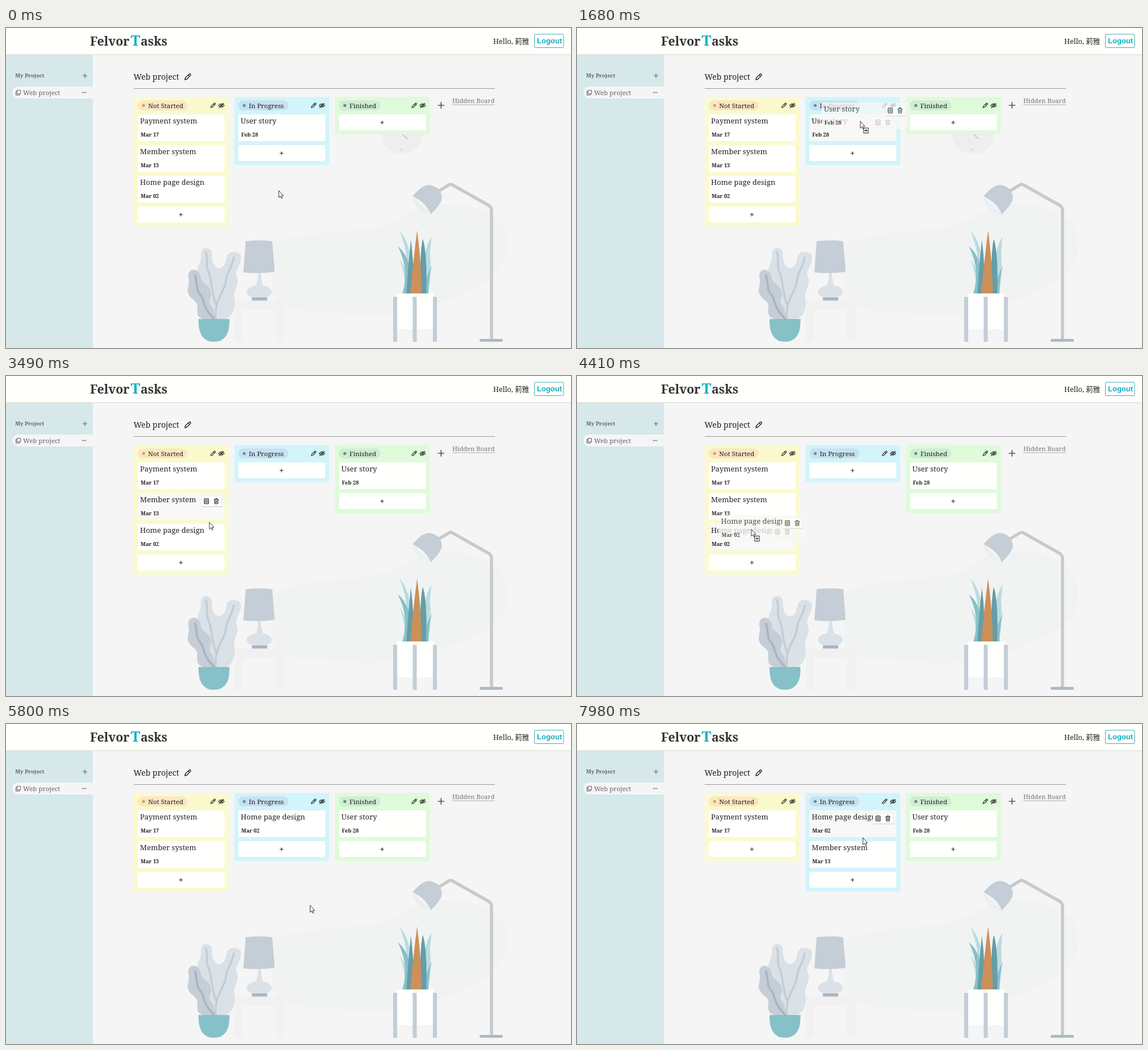
An HTML page for the animation above (8000 ms loop, 995 by 563 pixels).

```html
<!DOCTYPE html>
<html lang="en">
<head>
<meta charset="utf-8">
<title>Task board</title>
<style>
html, body { margin: 0; width: 100%; height: 100%; overflow: hidden; background: #f5f5f5; }
svg { display: block; width: 100vw; height: 100vh; }
text { font-family: "Noto Serif", "Noto Sans CJK TC", "Noto Sans CJK JP", "Noto Sans CJK SC", serif; fill: #222; }
.name { font-size: 13px; }
.date { font-size: 9.4px; font-weight: bold; }
.head { font-size: 11.5px; }
.logo { font-size: 21.4px; font-weight: bold; fill: #333; }
.line { fill: none; stroke: #222; stroke-width: 1.1; stroke-linecap: round; stroke-linejoin: round; }
</style>
</head>
<body>
<svg viewBox="0 0 995 563" preserveAspectRatio="none">
  <defs>
    <g id="pencil" class="line"><path d="M-4 4l.8-3L2-3.8q1-.9 1.9 0t0 1.9L-1.2 3.2zM.8-2.6l1.9 1.9"/></g>
    <g id="eye" class="line"><path d="M-5 0Q0-6 5 0Q0 6-5 0zM-4 4L4-4"/><circle r="1.6"/></g>
    <path id="plus" class="line" d="M-2.7 0H2.7M0-2.7V2.7"/>
    <g id="tools">
      <rect x=".5" y="1" width="36" height="18.5" rx="2" fill="#000" opacity=".13"/>
      <rect width="36" height="18" rx="2" fill="#fffffe" stroke="#e4e4e4" stroke-width=".6"/>
      <g class="line">
        <rect x="5.2" y="4.8" width="7.6" height="9" rx="1" fill="#ddd"/>
        <path d="M7 7.3h4M7 9.3h4M7 11.3h4" stroke-width=".8"/>
        <path d="M22.3 6.3h8M24.9 6V4.7h2.8V6M23.2 6.5l.5 7.3h5.2l.5-7.3M25.4 8.5v3.2M27.2 8.5v3.2"/>
      </g>
    </g>
    <path id="arrow" d="M.5 0V12.3L3.3 9.7 5.1 13.8 6.9 13 5.2 9.1H8.6Z" fill="#fff" stroke="#222" stroke-width=".9"/>
    <g id="copy"><rect x="6.5" y="12" width="8" height="9" fill="#fff" stroke="#222"/>
      <path class="line" d="M8.3 16.5h4.4M10.5 14.3v4.4"/></g>
  </defs>

  <!-- room -->
  <rect width="995" height="563" fill="#f5f5f5"/>
  <path d="M472 380C560 345 650 370 710 325C760 295 840 310 868 340C900 385 880 430 830 455C760 490 690 512 600 503C540 497 490 505 470 470Z" fill="#f1f3f3"/>
  <path d="M403 480H490V552H475V496H417V552H403Z" fill="#f1f1f1"/>
  <circle cx="697" cy="185" r="37" fill="#eee"/>
  <path d="M695 184L707 195" stroke="#bbb" stroke-width="1.3"/>
  <circle cx="696" cy="214" r="2.2" fill="#ddd"/>
  <path d="M762 287L780 276Q783 274 786 276L850 312Q855 315 855 321V549" fill="none" stroke="#c8c9cb" stroke-width="5.5"/>
  <rect x="834" y="547" width="41" height="5" rx="2" fill="#adb9c3"/>
  <path d="M716 296L748 328Q719 323 716 296Z" fill="#eceff1"/>
  <path d="M716 296Q734 274 748 276.500Q768 281 767.500 301Q765 311 748 328Q742 309 716 296Z" fill="#c5ced6"/>

  <path d="M366 513C352 498 338 486 343 470C347 455 336 446 337 428C338 415 345 411 343 399Q343 387 353 387Q363 388 363 399C361 412 369 425 378 422C387 418 387 409 389 401Q393 393 402 394Q414 395 414 405C413 420 401 426 407 440C412 451 400 462 402 474C405 493 400 507 386 513Z" fill="#dae1e7"/>
  <path d="M352 394C357 407 350 417 357 431C364 447 361 465 370 486M401 404C398 422 388 430 387 446C385 466 368 473 369 512" fill="none" stroke="#c3cdd5" stroke-width="3.500" stroke-linecap="round"/>
  <path d="M352 513C333 510 337 499 337 489C337 478 320 476 320 462C320 453 324 449 321 438Q320 427 330 425Q341 426 343 439C344 451 358 450 361 464C363 474 354 480 361 488C368 496 366 505 369 513Z" fill="#c5ced6"/>
  <path d="M333 436C338 451 333 460 343 470C350 480 345 490 366 511" fill="none" stroke="#aab6c0" stroke-width="4" stroke-linecap="round"/>
  <path d="M339 512H393.500Q395 552 366 552Q338 552 339 512Z" fill="#86c1c8"/>

  <path d="M422 375Q446 372 469 375L473 429Q446 433 418 430Z" fill="#c5ced6"/>
  <path d="M444 431H449Q449 445 454 456H439Q444 445 444 431Z" fill="#dae1e7"/>
  <ellipse cx="446" cy="464" rx="22" ry="11.500" fill="#dae1e7"/>
  <rect x="433" y="474" width="27" height="5.500" fill="#aab6c0"/>

  <path d="M704 467Q714 405 693 357Q719 383 716 467ZM733 467Q730 400 749 367Q748 392 743 420L741 467ZM700 467Q706 440 693 407Q710 430 708 467ZM736 467Q743 430 746 390Q751 430 743 467Z" fill="#b9dcdf"/>
  <path d="M698 467Q711 425 690 384Q717 405 714 467ZM734 467Q738 440 750 418Q744 440 744 467Z" fill="#86c1c8"/>
  <path d="M705 467Q708 420 713 372Q719 420 718 467ZM729 467Q729 390 734 371Q742 395 740 467Z" fill="#659da8"/>
  <path d="M712 467Q717 410 724 356Q732 420 732 467Z" fill="#cd9058"/>
  <rect x="688" y="467" width="65" height="63" fill="#fffffe"/>
  <path d="M685.300 473V552M719.800 473V552M755.300 473V552" stroke="#c3cdd5" stroke-width="7"/>

  <!-- page frame -->
  <rect y="47" width="153" height="516" fill="#d6e8ea"/>
  <rect y="46" width="995" height="1.500" fill="#e3e1dc"/>
  <rect width="995" height="46" fill="#fffffc"/>
  <text class="logo" x="148" y="31">Felvor</text>
  <text class="logo" x="219.500" y="31" style="font-size:26px;fill:#17b3c6">T</text>
  <text class="logo" x="237" y="31">asks</text>
  <text x="858" y="28" font-size="12.600">Hello, 莉雅</text>
  <rect x="930.500" y="11" width="51.500" height="23.500" rx="2" fill="#fffffe" stroke="#3fa9b8"/>
  <text x="935" y="27" style="font:bold 13px 'Liberation Sans',sans-serif;fill:#17acc0">Logout</text>
  <text x="16" y="86.500" font-size="9.500" font-weight="bold" style="fill:#666">My Project</text>
  <path d="M135 84H143M139 80V88" stroke="#666" stroke-width="1.200"/>
  <path d="M153 103H21.500A10.500 10.500 0 0 0 21.500 124H153Z" fill="#f5f5f5"/>
  <path class="line" d="M19.500 109.500H25.500V116H19.500ZM19 111.500H17.500V118H23.500V116.500" style="stroke:#666"/>
  <text x="30" y="117.500" font-size="11.400" style="fill:#666">Web project</text>
  <path d="M134 113.500h1.800m1 0h1.800m1 0h1.800" stroke="#555" stroke-width="1.700"/>
  <text x="224.500" y="91" font-size="14">Web project</text>
  <use href="#pencil" transform="translate(320 86) scale(1.250)"/>
  <path d="M225 106.500H861" stroke="#999"/>
  <path d="M760.500 136H772M766.250 130.250V141.750" stroke="#555" stroke-width="1.700"/>
  <text x="786" y="132" font-size="11.200" style="fill:#777">Hidden Board</text>
  <path d="M786 135H861" stroke="#999" stroke-width=".8"/>

  <g id="boards"></g>
  <g id="pointer"></g>
</svg>
<script>
const LOOP = 8000, LAG = 40, CARD_W = 153, CARD_H = 47, PITCH = 54;
const columns = [
  { title: 'Not Started', fill: '#fafacd', pill: '#fbe7c2', dot: '#d9a05a', width: 88 },
  { title: 'In Progress', fill: '#d2f4fb', pill: '#c8e1ef', dot: '#5595b8', width: 88 },
  { title: 'Finished', fill: '#defbda', pill: '#d0ecd2', dot: '#5b9182', width: 73 }
];
const cards = [
  { name: 'Payment system', date: 'Mar 17', col: 0 },
  { name: 'Member system', date: 'Mar 13', col: 0 },
  { name: 'Home page design', date: 'Mar 02', col: 0 },
  { name: 'User story', date: 'Feb 28', col: 1 }
];
const [, member, home, story] = cards;
// in order of dropping
const drags = [
  { card: story, start: 1550, drop: 2440, to: 2 },
  { card: home, start: 4330, drop: 5250, to: 1 },
  { card: member, start: 6680, drop: 7310, to: 1 }
];
// pointer path: time, x, y
const path = [
  [0, 480, 286], [420, 480, 286], [560, 480, 272], [820, 478, 202], [1010, 477, 185],
  [1550, 477, 185], [1680, 498, 164], [1880, 592, 148], [2100, 683, 139], [2310, 703, 139],
  [3070, 703, 139], [3180, 665, 148], [3400, 405, 240], [3490, 358, 257], [3650, 305, 280], [3860, 289, 285],
  [4330, 289, 285], [4450, 315, 262], [4700, 440, 172], [4870, 508, 140], [5120, 529, 143],
  [5250, 529, 143], [5380, 530, 175], [5620, 534, 292], [5800, 535, 319],
  [6050, 535, 319], [6130, 285, 232],
  [6680, 285, 232], [6760, 310, 222], [6960, 480, 187], [7060, 509, 182],
  [7310, 509, 182], [7800, 505, 184], [7980, 503, 200], [LOOP, 503, 201]
];
const boards = document.getElementById('boards');
const pointer = document.getElementById('pointer');

function pointerAt(t) {
  t = Math.max(0, t);
  const i = Math.max(1, path.findIndex(p => p[0] > t));
  const [t0, x0, y0] = path[i - 1], [t1, x1, y1] = path[i];
  const k = (t - t0) / (t1 - t0);
  return { x: x0 + (x1 - x0) * k, y: y0 + (y1 - y0) * k };
}

const colX = i => 225 + i * 177.2;

function layout(t) {
  const stacks = columns.map((c, i) => cards.filter(card => card.col === i));
  for (const { card, drop, to } of drags) {
    if (t < drop) continue;
    const from = stacks[card.col];
    from.splice(from.indexOf(card), 1);
    stacks[to].push(card);
  }
  return stacks;
}

function cardSvg(card, x, y, active) {
  return `<g transform="translate(${x} ${y})">
    <rect width="${CARD_W}" height="${CARD_H}" rx="2" fill="${active ? '#f8f8f6' : '#fffffe'}"/>
    <text class="name" x="4" y="16">${card.name}</text>
    <text class="date" x="5" y="39">${card.date}</text>
    ${active ? '<use href="#tools" x="112" y="5"/>' : ''}</g>`;
}

function columnSvg(col, i, stack, isActive) {
  const x = colX(i), left = x + 7, plusY = 152 + stack.length * PITCH;
  return `<rect x="${x}" y="121.5" width="167" height="${plusY - 86.5}" rx="3" fill="${col.fill}"/>
    <rect x="${left}" y="127.5" width="${col.width}" height="17.5" rx="8.7" fill="${col.pill}"/>
    <circle cx="${x + 17.3}" cy="136.3" r="2.6" fill="${col.dot}"/>
    <text class="head" x="${x + 25.3}" y="140.5">${col.title}</text>
    <use href="#pencil" x="${x + 139.5}" y="136.3"/><use href="#eye" x="${x + 154.3}" y="136.3"/>
    ${stack.map((card, n) => cardSvg(card, left, 152 + n * PITCH, isActive(card, left, 152 + n * PITCH))).join('')}
    <rect x="${left}" y="${plusY}" width="${CARD_W}" height="28" rx="2" fill="#fffffe"/>
    <use href="#plus" x="${x + 83}" y="${plusY + 14.3}"/>`;
}

function draw(t) {
  const stacks = layout(t), now = pointerAt(t), seen = pointerAt(t - LAG);
  const drag = drags.find(d => t >= d.start && t < d.drop);
  const isActive = (card, x, y) => drag ? card === drag.card :
    seen.x >= x && seen.x <= x + CARD_W && seen.y >= y && seen.y <= y + CARD_H;
  boards.innerHTML = columns.map((col, i) => columnSvg(col, i, stacks[i], isActive)).join('');

  let ghost = '';
  if (drag) {
    const grab = pointerAt(drag.start), col = drag.card.col;
    const x = colX(col) + 7 + now.x - grab.x;
    const y = 152 + stacks[col].indexOf(drag.card) * PITCH + now.y - grab.y;
    ghost = `<g opacity=".76">${cardSvg(drag.card, x, y, true)}</g>`;
  }
  pointer.innerHTML = `${ghost}<g transform="translate(${now.x} ${now.y})">
    <use href="#arrow"/>${drag ? '<use href="#copy"/>' : ''}</g>`;
}

const begin = performance.now();
function tick() {
  draw((performance.now() - begin) % LOOP);
  requestAnimationFrame(tick);
}
tick();
</script>
</body>
</html>
```
